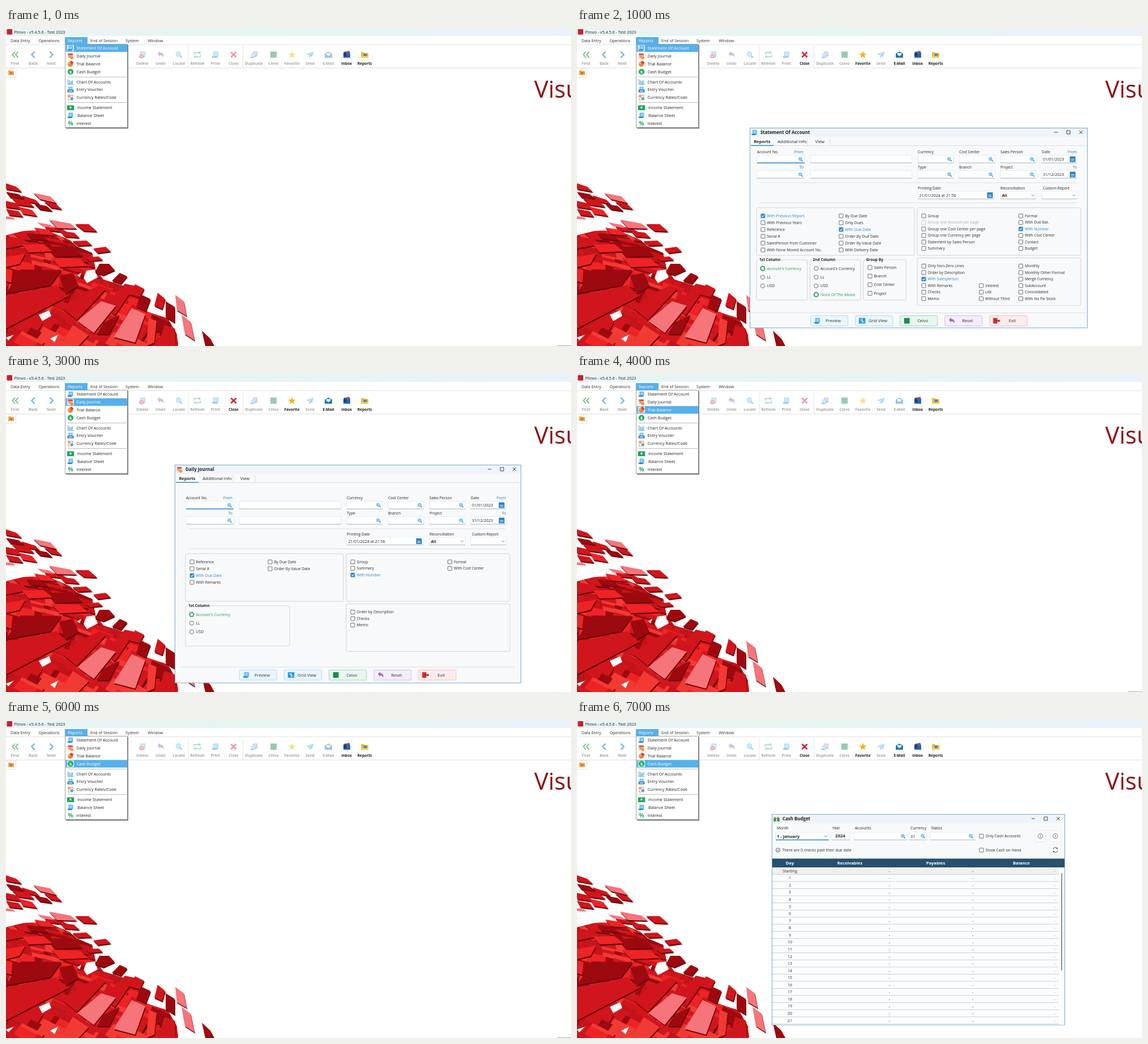
An HTML page for the animation above (8 s loop, 998x561 px).

```html
<!DOCTYPE html>
<html lang="en">
<head>
<meta charset="utf-8">
<title>Reports menu</title>
<style>
html, body { margin: 0; width: 100%; height: 100%; overflow: hidden; background: #fff; }
svg { display: block; width: 100%; height: 100%; }
text { font-family: "Open Sans", "Noto Sans", sans-serif; white-space: pre; }
</style>
</head>
<body>
<svg id="stage" viewBox="0 0 998 561"></svg>
<script>
const stage = document.getElementById('stage');
const BLUE = '#2a86d1', SKY = '#56b0ea', GREEN = '#1f9d58';

// ---- basic shapes ----
const rect = (x, y, w, h, fill, stroke = 'none', r = 0) =>
  `<rect x="${x}" y="${y}" width="${w}" height="${h}" fill="${fill}" stroke="${stroke}" stroke-width=".8" rx="${r}"/>`;
const text = (x, y, s, size = 6.8, fill = '#2b2b2b', weight = 400, anchor = 'start') =>
  `<text x="${x}" y="${y + size * .36}" font-size="${size}" fill="${fill}" font-weight="${weight}" text-anchor="${anchor}">${s}</text>`;
const line = (x1, y1, x2, y2, c = '#d5d8dc', w = .8) =>
  `<path d="M${x1} ${y1}L${x2} ${y2}" stroke="${c}" stroke-width="${w}"/>`;
const fillPath = (d, c) => `<path d="${d}" fill="${c}"/>`;
const stroke = (d, c, w = 1) => `<path d="${d}" fill="none" stroke="${c}" stroke-width="${w}"/>`;
const dot = (x, y, r, c, s = 'none', w = 1) =>
  `<circle cx="${x}" cy="${y}" r="${r}" fill="${c}" stroke="${s}" stroke-width="${w}"/>`;
const group = (x, y, body, k = 1) => `<g transform="translate(${x} ${y}) scale(${k})">${body}</g>`;

// ---- icons, centred on 0,0, about 14 units wide ----
const page = (c, d) => rect(-4.5, -6, 10, 11, c) + fillPath('M-7 3h10v3h-8q-2 0-2-3z', d) +
  stroke('M-2-3h5M-2-1h5M-2 1h5', '#fff', .8);
const icon = {
  first: stroke('M0-5.5-5 0 0 5.5M6-5.5 1 0 6 5.5', '#46b556', 2),
  back: stroke('M3-6-3 0 3 6', '#4a9fe0', 2.4),
  next: stroke('M-3-6 3 0-3 6', '#4a9fe0', 2.4),
  page: page('#5db9f0', '#2a86d1'),
  del: page('#6fb9ee', '#3a8fd8') + dot(-2, 3, 4, '#e8404c') + stroke('M-4 3h4', '#fff', 1.2),
  undo: fillPath('M-6-2-1-7v3q8 0 7 10-2-5-7-5v3z', '#a06bc4'),
  find: stroke('M2 2 6 6', '#2a86d1', 2.5) + dot(-1, -1, 4.5, '#8fd6fa', '#56b4ee', 1.5),
  refresh: stroke('M-6 0v-4H4M6 0v4H-4', '#37b36a', 1.8) + fillPath('M3-7 7-4 3-1zM-3 7-7 4-3 1z', '#37b36a'),
  close: stroke('M-5-5 5 5M5-5-5 5', '#dd2236', 3),
  dup: group(2, -1, page('#a58be0', '#6a5bc0'), .85) + group(-2, 2, page('#79bff2', '#3a8fd8'), .75),
  sheet: rect(-6, -6, 12, 12, '#1e8a50'),
  star: fillPath('M0-7 2-2 7-2 3 1.5 4.5 6.5 0 3.5-4.5 6.5-3 1.5-7-2-2-2z', '#f9b013'),
  plane: fillPath('M7-6-7-1-3 1zM7-6-2 2-2 7 1 3 4 5z', '#45a9e6'),
  mail: fillPath('M-7-2 0-6 7-2V6H-7z', '#1b75bd') + fillPath('M-4-3H4V0L0 3-4 0z', '#fff'),
  inbox: fillPath('M-6 6V-2q0-4 4-4h5q4 0 4 4v8z', '#1f66b5') + fillPath('M-6 3V-1q3-5 6 0v4z', '#173f78') +
    rect(1, -7, 1.5, 7, '#e33a3a') + rect(2, -7, 4, 3, '#e33a3a'),
  folder: fillPath('M-7-5h5l2 2h7V6H-7z', '#f8b928') + rect(-2, -2, 6, 5, '#2f8fdd') + rect(-7, 3, 14, 3, '#ffcf52'),
  calendar: rect(-6, -6, 11, 11, '#f8c3a0') + rect(-6, -6, 11, 4, '#e34f4f') + dot(3, 4, 3.5, '#f59b23') + stroke('M-4 0h5M-4 2h4', '#b55', .8),
  pie: dot(-.5, .5, 6, '#f2803b') + fillPath('M0 0V-7a7 7 0 0 1 7 6z', '#e23f45') + fillPath('M0 0-6 2A6 6 0 0 1-3-5z', '#f9b04c'),
  cash: dot(0, 0, 6.5, '#22ab5c') + text(0, 0, '$', 10, '#fff', 700, 'middle'),
  chart: stroke('M-6-6V6H7', '#3c89c9', 1) + stroke('M-3 5v-9M0 5v-6M3 5v-8', '#58b4ec', 1.8) + stroke('M5-4V4', '#48b98b', 1),
  printer: rect(-4, -6, 8, 6, '#9bd6f7', '#3a8fd8') + rect(-7, 0, 14, 6, '#2a86d1') + rect(-4, 2, 8, 2, '#d6effd'),
  rates: dot(-3, -3, 3.5, '#f1a553') + dot(3, 3, 3.5, '#4fa7e3') + stroke('M1-5h4v4M-1 6h-4V2', '#e2704b', 1.2),
  note: rect(-8, -5, 16, 11, '#23a55b') + dot(0, 0, 2.5, '#b5ecc9'),
  percent: text(0, 0, '%', 13, '#23ab5c', 700, 'middle'),
  grid: rect(-7, -6, 14, 12, '#2a9be0') + stroke('M-4-3 4 3M0-5V5', '#d8f0ff', 1.4),
  exit: rect(-7, -6, 9, 12, '#d92b35') + stroke('M-2 0h7M4-2 7 0 4 2', '#8d1720', 1.6),
  gift: rect(-7, -2, 14, 8, '#2b9b5c') + rect(-1.5, -2, 3, 8, '#f1d4a2') + fillPath('M-6-6 0-2 6-6 4-1H-4z', '#e34e4e')
};

// ---- tiled backdrop ----
const TILE = {
  dark: '#9c0a0f', mid: '#d0161c', red: '#ee2326', warm: '#f23a34', pink: '#f5757b'
};
function tiles(c, d) {
  return `<g transform="translate(1 2.2)">${fillPath(d, '#690408')}</g>` + fillPath(d, c);
}
function filler() {
  let seed = 23, out = '';
  const rnd = () => (seed = (seed * 16807) % 2147483647) / 2147483647;
  const shades = [TILE.mid, TILE.mid, TILE.dark, TILE.red, '#c2141a', TILE.warm, TILE.mid];
  for (let i = 0; i < 190; i++) {
    const y = 352 + i * 1.15, k = (y - 352) / 209, x = rnd() * (130 + 190 * k) - 20;
    const ux = 34 + 6 * k, uy = 4 + 18 * k, vx = 16 - 52 * k, vy = 11 + 34 * k;
    out += tiles(shades[rnd() * 7 | 0], `M${x} ${y}l${ux} ${uy} ${vx} ${vy} ${-ux} ${-uy}z`);
  }
  return out;
}
function backdrop() {
  const edge = 'M0 366 32 358 72 357 112 374 126 386 152 397 158 425 172 444 210 456 238 474 248 500 286 512 302 540 304 561 0 561z';
  return `<clipPath id="edge"><path d="${edge}"/></clipPath>` +
    `<g clip-path="url(#edge)">${fillPath(edge, '#c2141a')}${filler()}</g>` +
    fillPath('M142 428 157 426 162 440 143 450 137 441zM58 506 76 498 80 508 64 517zM55 457 66 452 62 462zM0 546 14 541 4 551zM78 548 92 541 86 554zM126 436 133 432 130 440z', '#fff') +
    tiles(TILE.dark, 'M0 289 22 293 34 302 8 299zM50 310 72 314 82 323 60 320zM36 362 62 364 75 375 44 372zM72 386 118 385 135 402 86 404zM165 416 182 416 192 427 172 436 157 431zM187 446 201 432 214 438 203 451zM26 426 98 427 78 454 0 468zM94 437 118 432 128 455 105 469z') +
    tiles(TILE.mid, 'M0 274 18 280 28 289 0 284zM27 295 52 303 60 311 36 306zM10 300 38 304 50 316 22 312zM67 306 88 310 99 320 80 317zM0 305 18 309 28 320 0 316zM0 319 22 323 30 333 6 330zM66 346 100 355 110 361 72 357zM122 346 146 346 161 359 137 358zM95 358 120 361 130 370 104 368zM0 376 28 371 42 381 0 389z') +
    tiles(TILE.mid, 'M117 376 142 375 152 383 127 384zM154 389 176 386 185 394 162 397zM140 405 163 403 171 409 148 411zM0 472 88 454 110 473 0 530zM130 470 164 455 176 461 125 515 100 495zM210 451 228 455 192 507 174 492zM228 452 244 460 236 475 218 470zM268 467 281 478 276 496 262 490z') +
    tiles(TILE.red, 'M22 315 46 321 55 332 30 328zM50 352 75 356 90 366 60 364zM80 405 130 407 145 420 95 422zM28 382 66 381 82 394 40 396zM0 404 34 398 24 416 0 422z') +
    tiles(TILE.dark, 'M238 470 255 478 247 500 230 492zM282 482 298 492 298 520 282 510zM258 505 290 520 286 540 250 530zM346 534 361 548 368 561 352 561zM172 520 200 506 182 540 160 540z') +
    tiles(TILE.warm, 'M252 511 266 517 262 555 248 561zM118 524 146 542 128 561 96 561z') +
    tiles(TILE.mid, 'M280 524 298 530 300 561 268 561z') +
    tiles(TILE.pink, 'M48 291 78 297 90 309 60 302zM76 338 114 345 125 354 90 353zM168 482 194 490 155 538 126 517zM222 494 246 505 228 555 190 545zM299 471 314 482 319 508 302 498zM310 506 326 518 333 551 316 540z') +
    fillPath('M0 332 12 334 17 338 0 337zM55 343 78 347 86 353 64 350z', TILE.pink);
}

// ---- main window ----
const TOOLS = [
  ['First', 16, 'first'], ['Back', 48, 'back'], ['Next', 80, 'next'], ['Save', 208.5, 'page'],
  ['Delete', 241, 'del'], ['Undo', 273, 'undo'], ['Locate', 305.5, 'find'], ['Refresh', 338, 'refresh'],
  ['Print', 370, 'page'], ['Close', 402, 'close'], ['Duplicate', 438, 'dup'], ['Celvo', 472.5, 'sheet'],
  ['Favorite', 505, 'star'], ['Send', 537, 'plane'], ['E-Mail', 569.5, 'mail'], ['Inbox', 601.5, 'inbox'],
  ['Reports', 633.5, 'folder']
];
const toolbar = open => TOOLS.map(([name, x, ic]) => {
  const on = /Inbox|Reports/.test(name) || open && /Close|Favorite|E-Mail/.test(name);
  const alpha = on ? 1 : x < 90 ? .8 : .45;
  return `<g opacity="${alpha}">${group(x, 47, icon[ic], .92)}</g>` +
    text(x, 63, name, 6.6, on ? '#1d1d1d' : '#a6a6a6', 700, 'middle');
}).join('');

const MENU = [
  ['Statement Of Account', 35.5, 'page'], ['Daily Journal', 49.5, 'calendar'], ['Trial Balance', 63.3, 'pie'],
  ['Cash Budget', 77.2, 'cash'], ['Chart Of Accounts', 95, 'chart'], ['Entry Voucher', 108.8, 'printer'],
  ['Currency Rates/Code', 122.5, 'rates'], ['Income Statement', 140.3, 'note'], ['Balance Sheet', 154.2, 'page'],
  ['Interest', 168, 'percent']
];
const menu = sel => rect(106, 30, 110, 147.5, '#777') + rect(104.5, 28.5, 110, 147, '#fff', '#8a8a8a') +
  line(109, 86.5, 213, 86.5, '#aaa') + line(109, 131.5, 213, 131.5, '#aaa') +
  MENU.map(([name, y, ic], i) =>
    (i === sel ? rect(105.5, y - 6.7, 108.5, 13.4, SKY) + rect(108, y - 5.5, 12, 11, '#d9effc') : '') +
    group(114, y, icon[ic], .78) +
    text(i === 7 || i === 8 ? 126 : 124.5, y, name, 7.2, i === sel ? '#fff' : '#222')).join('');

const shell = () =>
  `<linearGradient id="bar"><stop stop-color="#e9f3f4"/><stop offset=".45" stop-color="#e5f5f1"/><stop offset="1" stop-color="#e9f2fa"/></linearGradient>` +
  rect(0, 0, 998, 561, '#fff') + backdrop() + text(933, 107.5, 'Visual', 42, '#8f0d12') +
  rect(0, 0, 998, 14, 'url(#bar)') + rect(1.5, 2, 9.5, 9.5, '#c9202b', 'none', 1) +
  text(14.5, 7, 'Plinvo - v5.4.5.6 - Test 2023', 7.2, '#222') +
  rect(104, 16, 40, 12.5, SKY) +
  [['Data Entry', 8], ['Operations', 57.5], ['Reports', 109], ['End of Session', 149], ['System', 211], ['Window', 250.5]]
    .map(([s, x]) => text(x, 22.5, s, 7.1, s === 'Reports' ? '#fff' : '#2b2b2b')).join('') +
  line(0, 29.5, 998, 29.5, '#dcdcdc') + line(0, 70.5, 998, 70.5, '#d6d6d6') +
  line(322, 31, 322, 70, '#dedede') + line(418.5, 31, 418.5, 70, '#dedede') +
  rect(-.5, 71, 18, 16.5, '#fff', '#dedede') + fillPath('M4 75h4l1 1h5v7H4z', '#f6a33b') +
  fillPath('M9 81.5l-2.5-2.5q1-2 2.5 0 1.500-2 2.500 0z', '#e6404a');

// ---- dialog parts ----
function frame(x, y, w, h, title, ic, tabs = []) {
  let out = rect(x + .5, y + .5, w - 1, h - 1, '#f8f9fb', '#5596c0') + rect(x + 1, y + 1, w - 2, 15, '#eff4fa') +
    group(x + 8.5, y + 8.5, icon[ic], .75) + text(x + 19, y + 8.5, title, 7.9, '#1d1d1d', 700);
  const r = x + w, c = y + 8;
  out += stroke(`M${r - 59} ${c}h6M${r - 37} ${c - 3}h6v6h-6zM${r - 15} ${c - 3}l6 6m0-6l-6 6`, '#333', .9);
  if (tabs.length) {
    out += line(x + 2, y + 31.5, r - 2, y + 31.5) + rect(x + 2, y + 17, 40, 14, '#fff') + rect(x + 2, y + 30.5, 40, 1.5, BLUE);
    tabs.forEach((s, i) => {
      out += text(x + [22, 75, 124][i], y + 24.5, s, 7.5, '#222', i ? 400 : 700, 'middle');
    });
    out += line(x + 102, y + 18, x + 102, y + 31) + line(x + 142, y + 18, x + 142, y + 31);
  }
  return out;
}
const lens = (x, y) => group(x, y, icon.find, .62);
const label = (x, y, s) => text(x, y, s, 6.7, '#222', 500);
const chevron = (x, y) => stroke(`M${x - 2.5} ${y - 1.2}l2.5 2.500 2.500-2.500`, '#555', .8);
function field(x, y, w, kind = '', value = '', active = false) {
  let out = rect(x, y, w, 13.5, '#fff', '#e4e7ea') + line(x, y + 13.5, x + w, y + 13.5, active ? BLUE : '#a9b3ba', active ? 1.5 : .9);
  if (kind === 'lens') out += lens(x + w - 7, y + 7);
  if (kind === 'pick') out += chevron(x + w - 5.5, y + 7);
  if (kind === 'date') out += rect(x + w - 12, y + 2.5, 9, 9, '#2a86d1', '#1b639f') + stroke(`M${x + w - 10.5} ${y + 7}h6m-6 2.500h6`, '#d8f0ff', 1);
  return out + (value ? text(x + 2.5, y + 7, value, 7, '#222', kind === 'pick' ? 700 : 400) : '');
}
const panel = (x, y, w, h, title = '') => rect(x, y, w, h, 'none', '#c6cbd0', 2.5) +
  (title ? rect(x + 4, y - 3, title.length * 3.8 + 2, 6, '#f8f9fb') + text(x + 5, y, title, 6.7, '#222', 700) : '');
function check(x, y, s, on, dim) {
  const c = dim ? '#b9b9b9' : on ? BLUE : '#444';
  return rect(x - 3.5, y - 3.5, 7, 7, on ? BLUE : '#fff', c, .8) +
    (on ? stroke(`M${x - 2} ${y}l1.500 1.700 2.700-3.300`, '#fff', 1.1) : '') +
    text(x + 7, y, s, 6.75, dim ? '#adadad' : on ? BLUE : '#2b2b2b');
}
// a leading * marks a chosen entry, ~ a dimmed one
const checks = (x, y, step, list) => list.split('|').map((s, i) =>
  s && check(x, y + i * step, s.replace(/^[*~]/, ''), s[0] === '*', s[0] === '~')).join('');
const radios = (x, y, list) => list.split('|').map((s, i) => {
  const on = s[0] === '*', c = y + i * 15.3;
  return dot(x, c, 3.6, '#fff', on ? GREEN : '#444', on ? 1.8 : .8) + text(x + 7.5, c, s.replace('*', ''), 6.8, on ? GREEN : '#2b2b2b');
}).join('');
const BUTTONS = [
  ['Preview', 'page', '#eaf5fc', '#a9d3ee'], ['Grid View', 'grid', '#eaf5fc', '#a9d3ee'], ['Celvo', 'sheet', '#e8f6ee', '#8fcfaa'],
  ['Reset', 'undo', '#f3edf9', '#c9b0de'], ['Exit', 'exit', '#fcecec', '#eeb0b0']
];
const buttons = y => line(307, y - 5, 900, y - 5) + BUTTONS.map(([s, ic, bg, edge], i) => {
  const x = 412.5 + i * 79.1;
  return rect(x, y, 66, 18, bg, edge, 2) + group(x + 12, y + 9, icon[ic], .82) + text(x + 40, y + 9, s, 7.5, '#333', 400, 'middle');
}).join('');

// shared upper half of the report dialogs
const filters = () => {
  let out = '';
  [['Currency', 602], ['Cost Center', 675], ['Sales Person', 748]].forEach(([s, x], i) => {
    out += label(x, 219, s) + field(x, 224.5, 63, 'lens') + label(x, 246, ['Type', 'Branch', 'Project'][i]) + field(x, 251.5, 63, 'lens');
  });
  ['From', 'To'].forEach((s, i) => {
    const y = 219 + i * 27;
    out += text(400, y, s, 6.7, '#2d71a8', 400, 'end') + text(883, y, s, 6.7, '#2d71a8', 400, 'end') +
      field(318, y + 5.5, 84, 'lens', '', !i) + field(412.5, y + 5.5, 179, '') +
      field(820.5, y + 5.5, 62.5, 'date', i ? '31/12/2023' : '01/01/2023');
  });
  return out + label(318, 219, 'Account No.') + label(821, 219, 'Date') + line(324, 273, 883, 273) + line(324, 308.5, 883, 308.5) +
    label(602, 282.5, 'Printing Date') + field(602, 288, 135, 'date', '21/01/2024 at 21:56') +
    label(748, 282.5, 'Reconciliation') + field(748, 288, 63, 'pick', 'All') +
    label(823, 282.5, 'Custom Report') + field(821, 288, 62.5, 'pick');
};
const TABS = ['Reports', 'Additional Info', 'View'];

const statement = () => frame(305, 176, 597, 353.5, 'Statement Of Account', 'page', TABS) + filters() +
  panel(317, 317, 279, 84) + panel(601, 317, 289, 84) + panel(601, 405.5, 289, 84) +
  checks(328.5, 331.5, 12, '*With Previous Report|With Previous Years|Reference|Serial #|SalesPerson from Customer|With None Moved Account No.') +
  checks(466.5, 331.5, 12, 'By Due Date|Only Dues|*With Due Date|Order By Due Date|Order By Value Date|With Delivery Date') +
  checks(612.5, 331.5, 11.5, 'Group|~Group one Account per page|Group one Cost Center per page|Group one Currency per page|Statement by Sales Person|Summary') +
  checks(784, 331.5, 11.5, 'Formal|With Due Bal.|*With Number|With Cost Center|Contact|Budget') +
  checks(612.5, 420, 11.5, 'Only Non-Zero Lines|Order by Description|*With Salesperson|With Remarks|Checks|Memo') +
  checks(714, 454.5, 11.5, 'Interest|Lite|Without Third') +
  checks(784, 420, 11.5, 'Monthly|Monthly Other Format|Merge Currency|SubAccount|Consolidated|With No Fix Stock') +
  panel(317, 409, 90, 71, '1st Column') + panel(411.5, 409, 89.5, 71, '2nd Column') + panel(505.5, 409, 75.5, 71, 'Group By') +
  radios(328, 424.3, "*Account's Currency|LL|USD") + radios(422.5, 424.3, "Account's Currency|LL|USD|*None Of The Above") +
  checks(517.5, 422.5, 15.2, 'Sales Person|Branch|Cost Center|Project') + buttons(507.5);

const journal = () => frame(298, 160, 612, 385.5, 'Daily Journal', 'calendar', TABS) + filters() +
  panel(317, 317, 279, 84) + panel(601, 317, 289, 84) + panel(317, 409, 184, 71, '1st Column') + panel(601, 405.5, 289, 84) +
  checks(328.5, 331.5, 12, 'Reference|Serial #|*With Due Date|With Remarks') +
  checks(466.5, 331.5, 12, 'By Due Date|Order By Value Date') +
  checks(612.5, 331.5, 11.5, 'Group|Summary|*With Number') + checks(784, 331.5, 11.5, 'Formal|With Cost Center') +
  radios(328, 424.3, "*Account's Currency|LL|USD") + checks(612.5, 420, 11.5, 'Order by Description|Checks|Memo') + buttons(522);

const trial = () => frame(305, 176, 597, 354, 'Trial Balance', 'pie', TABS) + filters() +
  panel(317, 317, 279, 84) + panel(601, 317, 289, 84) + panel(601, 405.5, 289, 84) +
  checks(328.5, 331.5, 12, '*With Previous Report|With Previous Years|Reference|Serial #') +
  checks(466.5, 331.5, 12, 'By Due Date|Only Dues') +
  checks(612.5, 331.5, 11.5, 'Group|Group one Currency per page|Summary') + checks(784, 331.5, 11.5, 'Formal|Budget') +
  checks(612.5, 420, 11.5, 'Only Non-Zero Lines|Order by Description') + checks(784, 420, 11.5, 'Monthly|SubAccount|Consolidated') +
  panel(317, 409, 90, 71, '1st Column') + panel(411.5, 409, 89.5, 71, '2nd Column') +
  radios(328, 424.3, "*Account's Currency|LL|USD") + radios(422.5, 424.3, "Account's Currency|LL|USD|*None Of The Above") + buttons(507.5);

function budget() {
  let out = frame(344, 166, 518, 372.5, 'Cash Budget', 'gift') +
    [['Month', 353], ['Year', 451], ['Accounts', 491], ['Currency', 589], ['Status', 625.5]].map(([s, x]) => label(x, 191, s)).join('') +
    field(351, 198, 94, 'pick', '', true) + text(353, 205, '1 - January', 7.6, '#222', 700) +
    field(449, 198, 32) + text(465, 204.5, '2024', 7.6, '#222', 700, 'middle') +
    field(489, 198, 94, 'lens') + field(587, 198, 31, 'lens', '01') + field(624, 198, 79, 'lens') +
    check(714.5, 205, 'Only Cash Accounts') + check(714.5, 229.5, 'Show Cash on Hand') +
    dot(355, 229.500, 3.6, 'none', '#333', .8) + stroke('M353.2 229.500l1.400 1.500 2.200-2.800', '#333', .8) +
    text(362.5, 229.5, 'There are 0 checks past their due date', 6.9) +
    rect(809, 195, 19, 20, '#fbfcfd', '#dfe3e6', 2) + rect(835.5, 195, 19, 20, '#fbfcfd', '#dfe3e6', 2) + rect(835.5, 219, 19, 20, '#fbfcfd', '#dfe3e6', 2) +
    dot(818.5, 205, 4.2, 'none', '#444', .8) + stroke('M819.500 203l-2 2 2 2', '#444', .8) +
    dot(845, 205, 4.2, 'none', '#444', .8) + stroke('M844 203l2 2-2 2', '#444', .8) +
    stroke('M841 228a4 4 0 0 1 7.500-1v-2m0 2h-2M849 230a4 4 0 0 1-7.500 1.500v2m0-2h2', '#333', .9) +
    rect(345, 260, 516, 277.5, '#fbfcfd') + rect(345, 244.5, 516, 15.5, '#27506e') + rect(345, 260, 506, 12.3, '#efefef') +
    [['Day', 376], ['Receivables', 482], ['Payables', 633.5], ['Balance', 785]].map(([s, x]) => text(x, 252.5, s, 7.6, '#fff', 700, 'middle')).join('');
  for (let i = 0; i < 22; i++) {
    const y = 266.2 + i * 12.565;
    out += text(376, y, i || 'Starting', 7, '#333', 400, 'middle') + line(345, y + 6.2, 851, y + 6.2, '#c0c4c8') +
      [552, 699, 844].map(x => text(x, y, '-', 7.5, x > 800 ? '#888' : '#222', 400, 'middle')).join('');
  }
  return out + rect(855.4, 270, 1.6, 172, '#777', 'none', .8);
}

// ---- playback: each report is picked, then its dialog opens ----
const dialogs = [statement, journal, trial, budget];
stage.innerHTML = shell() + '<g id="live"></g>';
const live = document.getElementById('live');
const STEP = 1000;
let shown = -1;

function draw(now) {
  const step = Math.floor(now / STEP) % 8;
  if (step !== shown) {
    const pick = step >> 1, open = step % 2 === 1;
    live.innerHTML = toolbar(open) + menu(pick) + (open ? dialogs[pick]() : rect(973, 560, 25, 1, '#a8a8a8'));
    shown = step;
  }
  requestAnimationFrame(draw);
}
draw(performance.now());
</script>
</body>
</html>
```
